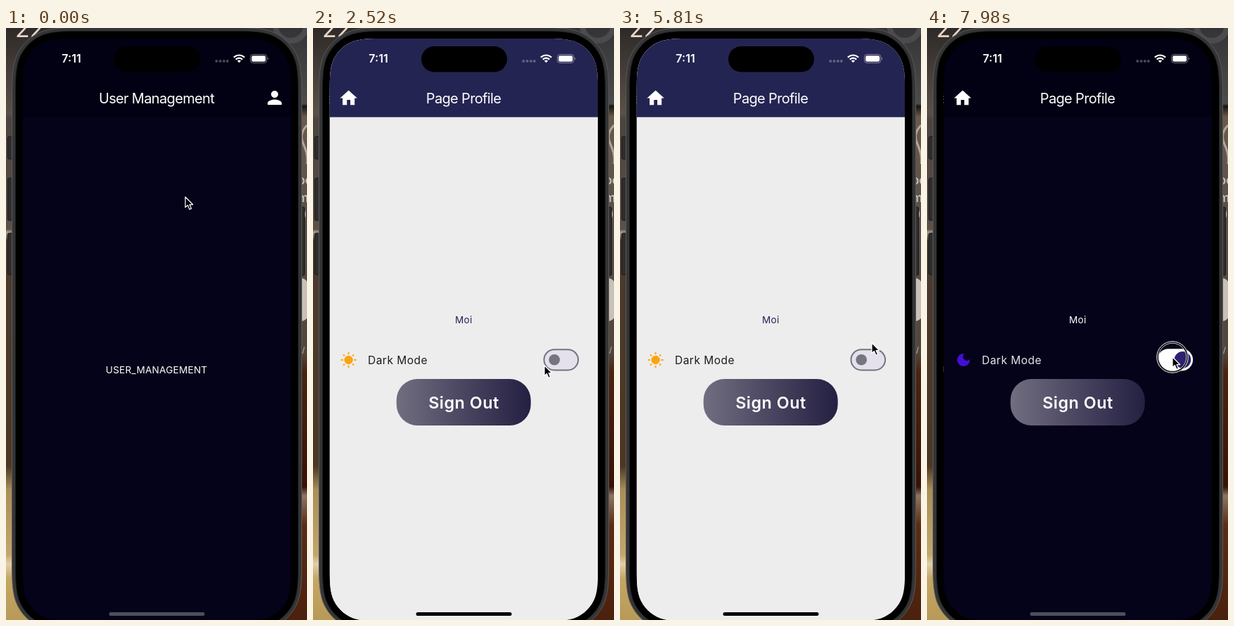
An HTML page that plays this animation: 428 by 840 pixels, repeating every 8 s.

```html
<!DOCTYPE html>
<html lang="en">
<head>
<meta charset="utf-8">
<title>Profile theme switch</title>
<style>
  html, body { margin: 0; width: 100%; height: 100%; overflow: hidden; background: #2f2a27; }
  svg { display: block; width: 428px; height: 840px; font-family: Inter, "Open Sans", sans-serif; }
  .title { font-size: 20px; letter-spacing: -.66px; fill: #fff; text-anchor: middle; }
  .body { font-size: 13.6px; letter-spacing: .24px; text-anchor: middle; fill: var(--text); }
  .bar { fill: var(--bar); }
  .page { fill: var(--page); }
</style>
</head>
<body>
<svg viewBox="0 0 428 840" xmlns="http://www.w3.org/2000/svg">
  <defs>
    <clipPath id="screen"><path id="mask"/></clipPath>
    <linearGradient id="left" x2="0" y2="1">
      <stop offset="0" stop-color="#2f2a28"/><stop offset=".145" stop-color="#5a5049"/>
      <stop offset=".155" stop-color="#4b433d"/><stop offset=".34" stop-color="#5d5047"/>
      <stop offset=".345" stop-color="#a99c8e"/><stop offset=".36" stop-color="#4a3a2e"/>
      <stop offset=".74" stop-color="#4c3724"/><stop offset=".78" stop-color="#a98e58"/>
      <stop offset=".89" stop-color="#c2a66c"/><stop offset=".905" stop-color="#e0cfaa"/>
      <stop offset=".93" stop-color="#c4a665"/><stop offset="1" stop-color="#b89a58"/>
    </linearGradient>
    <linearGradient id="right" x2="0" y2="1">
      <stop offset="0" stop-color="#343436"/><stop offset=".128" stop-color="#4d4c4c"/>
      <stop offset=".132" stop-color="#17130f"/><stop offset=".15" stop-color="#6a5a4d"/>
      <stop offset=".3" stop-color="#5b5148"/><stop offset=".55" stop-color="#52453b"/>
      <stop offset=".58" stop-color="#4a2411"/><stop offset=".775" stop-color="#381205"/>
      <stop offset=".79" stop-color="#8d7562"/><stop offset=".84" stop-color="#5c2c13"/>
      <stop offset="1" stop-color="#4a210e"/>
    </linearGradient>
    <linearGradient id="button">
      <stop offset="0" stop-color="#716e80"/><stop offset=".5" stop-color="#4a4560"/>
      <stop offset="1" stop-color="#242042"/>
    </linearGradient>
  </defs>

  <!-- wallpaper -->
  <rect width="214" height="840" fill="url(#left)"/>
  <rect x="214" width="214" height="840" fill="url(#right)"/>
  <circle cx="405" cy="-4" r="22" fill="none" stroke="#4b4b4d" stroke-width="8"/>
  <text x="13" y="13" font-size="34" fill="#e6d6c9">22</text>
  <g fill="#c9c1b8">
    <path d="M428 138q-12 12-5 27t5 28" fill="none" stroke="#b5a698" stroke-width="3"/>
    <text x="415" y="222" font-size="17" font-weight="600">oc</text>
    <text x="415" y="247" font-size="17" font-weight="600">m</text>
    <text x="422" y="269" font-size="15" font-weight="600">)</text>
    <rect x="410" y="355" width="19" height="61" rx="9"/>
    <text x="421" y="461" font-size="11">/</text>
  </g>

  <!-- phone -->
  <g fill="#302d2c" stroke="#1a1919">
    <rect x="2.5" y="154" width="8" height="32" rx="2"/>
    <rect x="2.5" y="213" width="8" height="60" rx="2"/>
    <rect x="2.5" y="291" width="8" height="59" rx="2"/>
    <rect x="417" y="254" width="7.5" height="97" rx="2"/>
  </g>
  <path id="shell" fill="#343536" stroke="#59595a"/>
  <path id="bezel" stroke="#1d1d1e"/>

  <g clip-path="url(#screen)">
    <g id="users">
      <rect class="page" x="24" y="15" width="381" height="827"/>
      <rect class="bar" x="24" y="15" width="381" height="111.5"/>
      <text class="title" x="214" y="107">User Management</text>
      <path transform="translate(367 84) scale(1.25)" fill="#fff" d="M12 12c2.21 0 4-1.79 4-4s-1.79-4-4-4-4 1.79-4 4 1.79 4 4 4zm0 2c-2.67 0-8 1.34-8 4v2h16v-2c0-2.66-5.33-4-8-4z"/>
      <text class="body" x="214.1" y="489.5">USER_MANAGEMENT</text>
    </g>
    <g id="profile">
      <rect class="page" x="24" y="15" width="381" height="827"/>
      <rect class="bar" x="24" y="15" width="381" height="111.5"/>
      <text class="title" x="214" y="107">Page Profile</text>
      <path transform="translate(36 84.8) scale(1.22)" fill="#fff" d="M10 20v-6h4v6h5v-8h3L12 3 2 12h3v8z"/>
      <text class="body" x="214.3" y="419">Moi</text>
      <g id="sun" transform="translate(50.6 471)" fill="#fba30f" stroke="#fba30f">
        <circle r="5.7"/><g id="rays" stroke-width="1.9"/>
      </g>
      <path id="moon" transform="translate(40 459)" fill="#420fd6" d="M12 3c-4.97 0-9 4.03-9 9s4.03 9 9 9 9-4.03 9-9c0-.46-.04-.92-.1-1.36-.98 1.37-2.58 2.26-4.4 2.26-2.98 0-5.4-2.42-5.4-5.4 0-1.81.89-3.42 2.26-4.4C12.92 3.04 12.46 3 12 3z"/>
      <text id="label" x="78" y="476.6" font-size="15.5" letter-spacing=".48">Dark Mode</text>
      <rect id="track" x="328.5" y="456.2" width="48.6" height="29.2" rx="14.6" stroke-width="2"/>
      <rect id="thumb"/>
      <rect x="118.7" y="498" width="191" height="66" rx="30" fill="url(#button)"/>
      <text x="214.5" y="540" font-size="23.3" font-weight="600" letter-spacing=".55" fill="#fff" text-anchor="middle">Sign Out</text>
    </g>

    <rect x="154" y="26" width="122" height="36.5" rx="18.2"/>
    <text x="93" y="49" font-size="16" font-weight="600" fill="#fff" text-anchor="middle">7:11</text>
    <g fill="#fff">
      <g opacity=".28"><circle cx="299.3" cy="47" r="2"/><circle cx="304.6" cy="47" r="2"/><circle cx="309.9" cy="47" r="2"/><circle cx="314.8" cy="47" r="2"/></g>
      <path d="M331.5 49.2l-2.7-2.7q2.7-2 5.4 0z"/>
      <g fill="none" stroke="#fff" stroke-width="2.1"><path d="M326.7 44.6q4.8-3.8 9.6 0"/><path d="M323.8 41.6q7.7-6.2 15.4 0"/></g>
      <rect x="347.5" y="37.5" width="23.4" height="12" rx="3.8" fill="none" stroke="#fff" stroke-opacity=".45"/>
      <rect x="349.2" y="39.2" width="20" height="8.6" rx="2.4"/>
      <path d="M372.2 41.6q2 1.9 0 3.8z" opacity=".5"/>
    </g>
    <rect id="home" x="146.5" y="829" width="136" height="5" rx="2.5"/>
  </g>

  <g id="cursor">
    <g id="ring" fill="none">
      <circle r="21" stroke="#000" stroke-width="3"/>
      <circle r="22.2" stroke="#fff"/><circle r="19.8" stroke="#fff" stroke-width=".8"/>
    </g>
    <path transform="translate(0 -.3) scale(.95)" d="M0 0V15.6L3.6 12.3 6.3 18.6 9 17.4 6.4 11.4H11.2Z" stroke="#fff" stroke-width="1.3" stroke-linejoin="round"/>
  </g>
</svg>
<script>
const LOOP = 8000, STEP = 70, WIDTH = 381;
const TO_LIGHT = 1452, TO_DARK = 6135;
const PUSH_1 = 530, POP = 3210, PUSH_2 = 5090, SLIDE = 500;
const PRESSES = [[430, 525], [1300, 1455], [3120, 3205], [4990, 5085], [6040, 6130], [7900, 8000]];
// time, x, y of the pointer tip
const PATH = [
  [0, 255, 240], [400, 380, 99], [700, 380, 99], [1290, 366, 472], [1540, 366, 472],
  [2000, 340, 556], [2310, 340, 556], [2520, 329, 479], [3060, 65, 98], [3120, 52, 98],
  [3280, 52, 98], [3950, 216, 400], [4300, 300, 583], [4700, 409, 125], [4900, 376, 103],
  [5160, 376, 103], [5580, 358, 447], [5810, 358, 447], [6020, 350, 474], [6130, 350, 474],
  [6300, 339, 497], [6580, 106, 466], [6860, 27, 464], [7140, 50, 471], [7400, 50, 471], [7900, 349, 467]
];

const $ = id => document.getElementById(id);
const set = (id, attrs) => { for (const k in attrs) $(id).setAttribute(k, attrs[k]); };
const clamp = v => Math.max(0, Math.min(1, v));
const mix = (a, b, u) => a + (b - a) * u;
const span = (t, start, length) => clamp((t - start) / length);
const easeOut = (u, power) => 1 - (1 - u) ** power;
const channels = hex => [1, 3, 5].map(i => parseInt(hex.slice(i, i + 2), 16));
const blend = (a, b, u) => {
  const to = channels(b);
  return `rgb(${channels(a).map((c, i) => Math.round(mix(c, to[i], u)))})`;
};

// one corner of a smooth-cornered box, from its vertical to its horizontal edge
const CORNER = [[0, 1.529], [0, 1.088], [0, .868], [.075, .631], [.169, .373], [.373, .169],
  [.631, .075], [.868, 0], [1.088, 0], [1.529, 0]];
function smoothBox(x, y, w, h, r) {
  const corner = (right, bottom) => CORNER.map(([u, v]) =>
    `${right ? x + w - u * r : x + u * r} ${bottom ? y + h - v * r : y + v * r}`);
  const curves = [corner(0, 0), corner(1, 0).reverse(), corner(1, 1), corner(0, 1).reverse()];
  return 'M' + curves.map(([from, ...rest]) => `${from}C${rest.join(' ')}`).join('L') + 'Z';
}

const STOPS = [0, .18, .44, 1];
function ramp(colors, u) {
  let i = 0;
  while (i < 2 && u > STOPS[i + 1]) i++;
  return blend(colors[i], colors[i + 1], (u - STOPS[i]) / (STOPS[i + 1] - STOPS[i]));
}

function pointer(t) {
  const i = PATH.findIndex(p => p[0] > t);
  if (i < 0) return PATH[PATH.length - 1].slice(1);
  const a = PATH[i - 1], b = PATH[i];
  const u = span(t, a[0], b[0] - a[0]), s = u * u * (3 - 2 * u);
  return [mix(a[1], b[1], s), mix(a[2], b[2], s)];
}

function drawTheme(t) {
  const light = span(t, TO_LIGHT, 200) - span(t, TO_DARK, 200);
  const lag = span(t, TO_LIGHT, 380) ** 2 - span(t, TO_DARK, 380) ** 2;
  const style = document.documentElement.style;
  style.setProperty('--bar', blend('#010113', '#242452', light));
  style.setProperty('--page', blend('#05031a', '#ededed', light));
  style.setProperty('--text', blend('#ffffff', '#242452', light));
  set('home', { fill: blend('#504f59', '#000000', light) });
  set('label', { fill: blend('#e6e4ea', '#1d1b20', lag) });

  const sunny = t >= TO_LIGHT && t < TO_DARK;
  set('sun', { visibility: sunny ? 'visible' : 'hidden' });
  set('moon', { visibility: sunny ? 'hidden' : 'visible' });

  const off = easeOut(span(t, TO_LIGHT, 300), 6) - easeOut(span(t, TO_DARK, 300), 6);
  const x = mix(363.5, 343.2, off), r = mix(11.8, 7.8, off);
  const stretch = Math.min(3.2, 33 * off * (1 - off));
  set('track', {
    fill: ramp(['#ffffff', '#b4b4c8', '#9896a4', '#e4e1ec'], light),
    stroke: ramp(['#ffffff', '#90909e', '#6c6a77', '#74757e'], light)
  });
  set('thumb', {
    x: x - r - stretch, y: 470.8 - r, width: 2 * (r + stretch), height: 2 * r, rx: r,
    fill: ramp(['#2c2270', '#6a6886', '#7f7da5', '#74757e'], light)
  });
}

function drawPages(t) {
  const shift = start => easeOut(span(t, start, SLIDE), 4);
  const open = shift(PUSH_1) - shift(POP) + shift(PUSH_2);
  set('users', { transform: `translate(${-open * WIDTH / 3} 0)` });
  set('profile', { transform: `translate(${(1 - open) * WIDTH} 0)` });
}

function draw(t) {
  drawTheme(t);
  drawPages(t);
  set('cursor', { transform: `translate(${pointer(t)})` });
  const pressed = PRESSES.some(([from, to]) => t >= from && t < to);
  set('ring', { visibility: pressed ? 'visible' : 'hidden' });
}

set('shell', { d: smoothBox(8.5, -.5, 412, 857, 69) });
set('bezel', { d: smoothBox(13.5, 4.5, 402, 847, 64) });
set('mask', { d: smoothBox(23.7, 15, 381.5, 826.5, 53.3) });
$('rays').innerHTML = Array.from({ length: 8 }, (_, i) =>
  `<path d="M0 -7.9V-${i % 2 ? 10.6 : 11}" transform="rotate(${i * 45})"/>`).join('');

const start = performance.now();
function tick() {
  const t = (performance.now() - start) % LOOP;
  draw(Math.floor(t / STEP) * STEP);
  requestAnimationFrame(tick);
}
tick();
</script>
</body>
</html>
```
